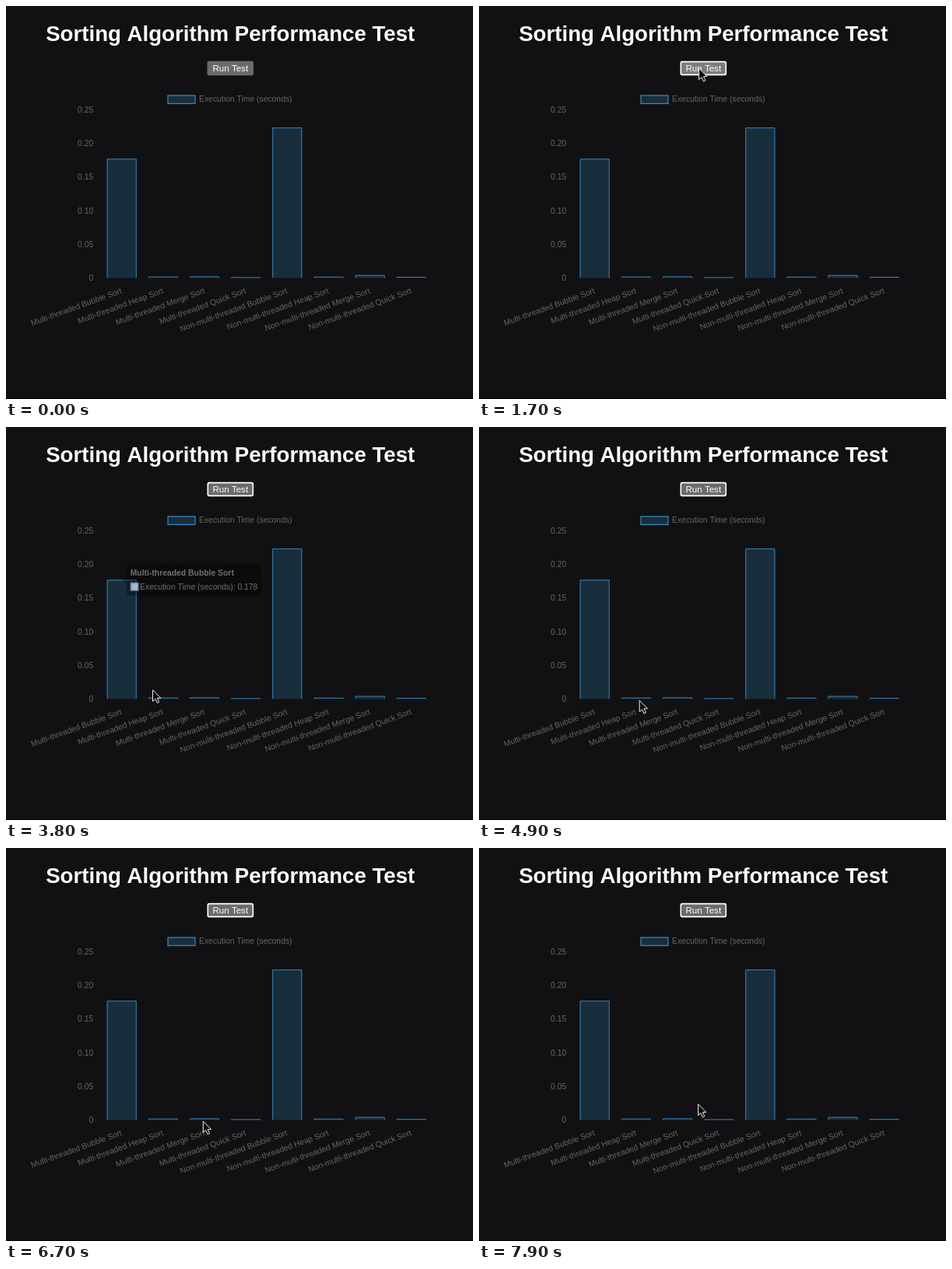
Animation of 600 by 505 pixels, one loop 8000 ms. Source, as an HTML page with a canvas:

```html
<!DOCTYPE html>
<html lang="en">
<head>
<meta charset="utf-8">
<title>Sorting Algorithm Performance Test</title>
<style>
html, body { margin: 0; width: 100%; height: 100%; overflow: hidden; background: #111113; }
canvas { display: block; width: 600px; height: 505px; }
</style>
</head>
<body>
<canvas id="stage" width="600" height="505"></canvas>
<script>
const ctx = document.getElementById('stage').getContext('2d');
const LOOP = 8000, STEP = 100;
const FAMILY = '"Liberation Sans", Arial, sans-serif';
const SMALL = '10.39px ' + FAMILY;
const LABEL = 'Execution Time (seconds)';
const FILL = '#192e3d', EDGE = '#3583b8', HOT_FILL = '#112d41', HOT_EDGE = '#2478b2';
const BASE = 349.4, PER_SECOND = 866, BAR_W = 38.2;
const ARROW = new Path2D('M0 0V14.6L3.4 11.5L5.8 16.8L8.2 15.7L5.9 10.5H10.4Z');

const sorts = ['Bubble', 'Heap', 'Merge', 'Quick'];
const seconds = [0.1763, 0.0014, 0.0017, 0.0006, 0.2226, 0.0013, 0.0038, 0.001];
const bars = seconds.map((s, i) => ({
  top: BASE - s * PER_SECOND,
  mid: 148.7 + 53.15 * i,
  name: (i < 4 ? 'Multi' : 'Non-multi') + '-threaded ' + sorts[i % 4] + ' Sort'
}));

// Pointer glides, each from where the last one stopped
const entry = { x: 54, y: 8 };
const glides = [
  { from: 100, to: 900, x: 111, y: 25 },
  { from: 900, to: 1500, x: 282, y: 79 },
  { from: 2300, to: 2900, x: 150, y: 224 },
  { from: 3300, to: 3900, x: 189, y: 340 },
  { from: 3900, to: 4300, x: 208, y: 351 },
  { from: 4500, to: 5400, x: 204.5, y: 350 },
  { from: 6200, to: 6900, x: 257, y: 350 },
  { from: 7500, to: 7900, x: 281, y: 328 }
];

const hovers = [
  { bar: bars[0], value: '0.178', on: 2800, off: 3660 },
  { bar: bars[1], value: '0.002', on: 5400, off: 6300 },
  { bar: bars[2], value: '0.003', on: 6800, off: 7600 }
];

const clamp = v => Math.max(0, Math.min(1, v));
const span = (t, a, b) => clamp((t - a) / (b - a));
const mix = (a, b, k) => a + (b - a) * k;
const easeOut = (k, power) => 1 - (1 - k) ** power;
const fade = (h, t) => span(t, h.on, h.on + 240) * (1 - span(t, h.off, h.off + 240));

function text(str, x, y, font, color, align = 'left') {
  ctx.font = font;
  ctx.fillStyle = color;
  ctx.textAlign = align;
  ctx.fillText(str, x, y);
}

function box(x, y, w, h, r, color) {
  ctx.beginPath();
  ctx.roundRect(x, y, w, h, r);
  ctx.fillStyle = color;
  ctx.fill();
}

function drawButton(t) {
  const pressed = t >= 1500 && t < 1700;
  const hot = t >= 1400 && t < 2400;
  const color = pressed ? '#8a8a8a' : hot ? '#7c7c7c' : '#6b6b6b';
  box(258.5, 70.8, 59.6, 18.4, 2.6, t >= 1500 ? '#fff' : color);
  box(260.1, 72.4, 56.4, 15.2, 1.6, color);
  text('Run Test', 288.3, 84.1, '11.55px ' + FAMILY, '#fff', 'center');
}

function drawBar(bar, fill, edge) {
  const x = bar.mid - BAR_W / 2, right = x + BAR_W;
  ctx.fillStyle = fill;
  ctx.fillRect(x, bar.top, BAR_W, BASE - bar.top);
  ctx.beginPath();
  ctx.moveTo(x + 0.5, BASE);
  ctx.lineTo(x + 0.5, bar.top);
  ctx.lineTo(right - 0.5, bar.top);
  ctx.lineTo(right - 0.5, BASE);
  ctx.strokeStyle = edge;
  ctx.lineWidth = 1;
  ctx.stroke();
}

function drawChart(t) {
  ctx.lineWidth = 1.3;
  ctx.fillStyle = FILL;
  ctx.strokeStyle = EDGE;
  ctx.fillRect(208, 115, 35, 10.4);
  ctx.strokeRect(208, 115, 35, 10.4);
  text(LABEL, 248, 123, SMALL, '#666');

  for (let i = 0; i <= 5; i++) {
    const value = i ? (i * 0.05).toFixed(2) : '0';
    text(value, 112.3, BASE - PER_SECOND * 0.05 * i + 3.7, SMALL, '#666', 'right');
  }

  for (const bar of bars) {
    drawBar(bar, FILL, EDGE);
    ctx.save();
    ctx.translate(bar.mid - 0.4, 365.2);
    ctx.rotate(-Math.PI / 9);
    text(bar.name, 0, 3.7, SMALL, '#666', 'right');
    ctx.restore();
  }

  for (const h of hovers) {
    ctx.globalAlpha = fade(h, t + STEP);
    drawBar(h.bar, HOT_FILL, HOT_EDGE);
  }
  ctx.globalAlpha = 1;
}

// Each tooltip glides over from the place of the one before
function drawTooltip(h, i, t) {
  const last = i ? hovers[i - 1].bar : { mid: 183, top: 148 };
  const k = easeOut(span(t, h.on, h.on + 400), 4);
  const x = mix(last.mid, h.bar.mid, k) + 5.8;
  const y = mix(last.top, h.bar.top, k) - 20.2;

  ctx.globalAlpha = fade(h, t);
  ctx.beginPath();
  ctx.roundRect(x, y, 173.6, 40.2, 5);
  ctx.moveTo(x, y + 15.8);
  ctx.lineTo(x - 4.3, y + 20.1);
  ctx.lineTo(x, y + 24.4);
  ctx.fillStyle = 'rgba(0,0,0,0.8)';
  ctx.fill();

  text(h.bar.name, x + 5.2, y + 14.4, 'bold ' + SMALL, '#fff');
  box(x + 5.2, y + 23.2, 11, 11, 0, '#fff');
  box(x + 6, y + 24, 9.4, 9.4, 0, '#86bfe6');
  box(x + 6.9, y + 24.9, 7.6, 7.6, 0, '#d3e8f7');
  text(LABEL + ': ' + h.value, x + 17.6, y + 32, SMALL, '#fff');
  ctx.globalAlpha = 1;
}

function drawPointer(t) {
  if (t < glides[0].from) return;
  let { x, y } = entry;
  for (const g of glides) {
    const k = easeOut(span(t, g.from, g.to), 2);
    x = mix(x, g.x, k);
    y = mix(y, g.y, k);
  }
  ctx.save();
  ctx.translate(x + 0.6, y + 1.1);
  ctx.fillStyle = '#0c0c0c';
  ctx.fill(ARROW);
  ctx.strokeStyle = '#f0f0f0';
  ctx.lineWidth = 1;
  ctx.lineJoin = 'round';
  ctx.stroke(ARROW);
  ctx.restore();
}

function draw(t) {
  ctx.fillStyle = '#111113';
  ctx.fillRect(0, 0, 600, 505);
  ctx.fillStyle = '#000';
  ctx.fillRect(0, 504, 600, 1);
  text('Sorting Algorithm Performance Test', 288.2, 45, 'bold 27.65px ' + FAMILY, '#fff', 'center');
  drawButton(t);
  drawChart(t);
  hovers.forEach((h, i) => drawTooltip(h, i, t));
  drawPointer(t);
}

const start = performance.now();
function tick(now) {
  const t = Math.max(0, now - start) % LOOP;
  draw(Math.floor(t / STEP) * STEP);
  requestAnimationFrame(tick);
}
draw(0);
requestAnimationFrame(tick);
</script>
</body>
</html>
```
